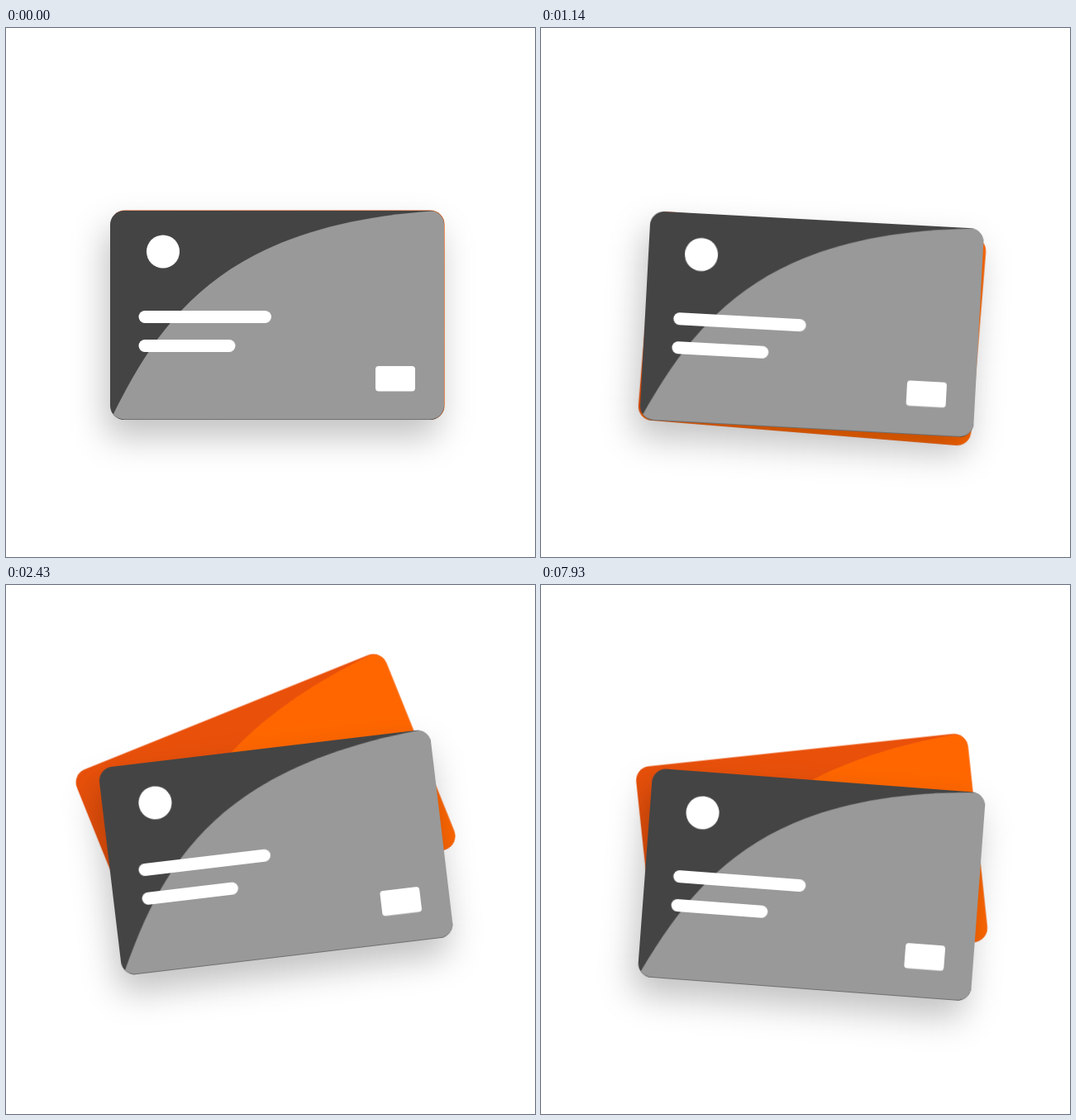
Write an HTML page without scripts that moves like this. It is 640 px wide and 640 px high and loops after 8 s.

```html
<!DOCTYPE html>
<html lang="en">
<head>
<meta charset="utf-8">
<title>Two cards</title>
<style>
  html, body { margin: 0; width: 100%; height: 100%; overflow: hidden; background: #fff; }
  svg { display: block; width: 100vw; height: 100vh; }

  /* both cards swing about the middle of their left edge */
  .card { transform-origin: 126px 347px; animation: 8s infinite; }
  .back { animation-name: back; }
  .front { animation-name: front; }

  @keyframes front {
    0% { transform: rotate(0deg); animation-timing-function: cubic-bezier(.25, .2, .66, 1); }
    10.75% { transform: rotate(6deg); animation-timing-function: cubic-bezier(.37, 0, .4, 1); }
    25% { transform: rotate(-9.7deg); animation-timing-function: ease-in-out; }
    39.25%, 92.875% { transform: rotate(0deg); animation-timing-function: linear; }
    93.75% { transform: rotate(.4deg); animation-timing-function: cubic-bezier(.4, .3, .7, .7); }
    99.125% { transform: rotate(4.3deg); animation-timing-function: linear; }
    100% { transform: rotate(4.9deg); }
  }

  @keyframes back {
    0% { transform: rotate(0deg); animation-timing-function: cubic-bezier(.25, .2, .66, 1); }
    10.75% { transform: rotate(6.9deg); animation-timing-function: cubic-bezier(.655, 0, .29, 1); }
    25% { transform: rotate(-24.9deg); animation-timing-function: ease-in-out; }
    39.25%, 92.875% { transform: rotate(-15deg); animation-timing-function: linear; }
    93.75% { transform: rotate(-14.2deg); animation-timing-function: cubic-bezier(.4, .3, .7, .7); }
    99.125% { transform: rotate(-6.1deg); animation-timing-function: linear; }
    100% { transform: rotate(-4.7deg); }
  }
</style>
</head>
<body>
<svg viewBox="0 0 640 640">
  <defs>
    <clipPath id="edge"><rect x="126" y="221" width="404" height="252.4" rx="17"/></clipPath>
    <path id="sweep" clip-path="url(#edge)" d="M127 473C190 344 270 235 530 220.5V474H127Z"/>
    <filter id="soft" x="-30%" y="-40%" width="160%" height="180%">
      <feGaussianBlur stdDeviation="20"/>
    </filter>
  </defs>

  <g class="card back">
    <rect x="126.8" y="220.5" width="403.6" height="253.2" rx="17" fill="#e9500a"/>
    <use href="#sweep" x=".6" fill="#f60"/>
  </g>

  <g class="card front">
    <rect x="120" y="242" width="404" height="253" rx="17" fill-opacity=".24" filter="url(#soft)"/>
    <rect x="126" y="221" width="404" height="253" rx="17" fill="#444"/>
    <use href="#sweep" fill="#999"/>
    <g fill="#fff">
      <circle cx="190" cy="270.5" r="20"/>
      <rect x="160.5" y="342" width="160.5" height="15" rx="7.5"/>
      <rect x="160.5" y="377" width="117" height="15" rx="7.5"/>
      <rect x="447" y="409" width="48" height="30.5" rx="4"/>
    </g>
  </g>
</svg>
</body>
</html>
```
